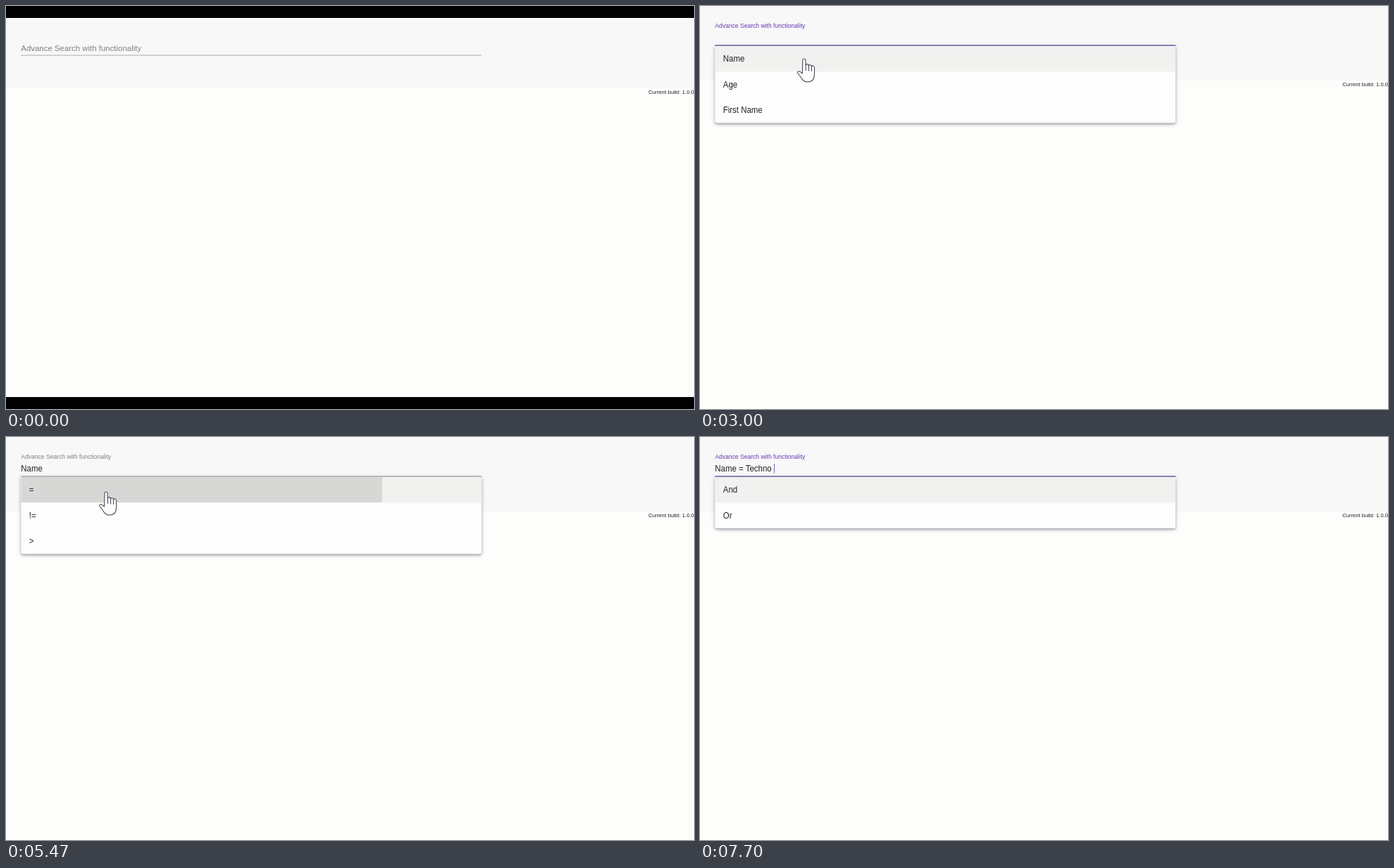
An HTML page with a canvas for the animation above (8000 ms loop, 977x573 px).

```html
<!DOCTYPE html>
<html lang="en">
<head>
<meta charset="utf-8">
<title>Advance Search</title>
<style>
  html, body { margin: 0; width: 100%; height: 100%; overflow: hidden; background: #000; }
  canvas { display: block; width: 977px; height: 573px; }
</style>
</head>
<body>
<canvas id="stage" width="977" height="573"></canvas>
<script>
const ctx = document.getElementById('stage').getContext('2d');
const W = 977, H = 573, LOOP = 8000;
const TOP = 17, BOTTOM = 556;
const LEFT = 21.3, RIGHT = 675.3, LINE = 70, ROW = 34.28;
const PANEL_TOP = 70.5, BASELINE = 63.5;
const LABEL = 'Advance Search with functionality';
const GREY = [128, 128, 128], PURPLE = [103, 58, 183];

// Each list of options: when it opens and closes, and how long it unfolds.
const panels = [
  { from: 1400, to: 3470, open: 0, rows: ['Name', 'Age', 'First Name'] },
  { from: 3630, to: 5570, open: 100, rows: ['=', '!=', '>'] },
  { from: 5770, to: 7130, open: 100, rows: ['Niren', 'Techno', 'Saviour', 'LunarGardener', 'Niren Kamesh Dey'] },
  { from: 7670, to: LOOP, open: 0, rows: ['And', 'Or'] }
];
const values = [[7470, 'Name = Techno '], [5680, 'Name = '], [3570, 'Name '], [0, '']];
const focusSpans = [
  { from: 1400, to: 3170, grow: 0 },
  { from: 3470, to: 5270, grow: 300 },
  { from: 5570, to: LOOP, grow: 300 }
];
const blinkStarts = [7670, 5830, 3800, 1400];
const ripples = [{ at: 3200, x: 148, end: 3470 }, { at: 5300, x: 142, end: 5570 }];

const clamp = v => Math.max(0, Math.min(1, v));
const mix = (a, b, k) => a + (b - a) * k;
const phase = (t, from, length) => length ? clamp((t - from) / length) : +(t >= from);
const smooth = k => k * k * (3 - 2 * k);
const rgb = (a, b, k) => `rgb(${a.map((v, i) => Math.round(mix(v, b[i], k))).join(',')})`;

// Cubic bezier (0, 0, 0.2, 1)
function decelerate(x) {
  let lo = 0, hi = 1;
  for (let i = 0; i < 20; i++) {
    const u = (lo + hi) / 2;
    if (0.6 * u * u + 0.4 * u * u * u < x) lo = u; else hi = u;
  }
  return lo * lo * (3 - 2 * lo);
}

function rect(x, y, w, h, color) {
  ctx.fillStyle = color;
  ctx.fillRect(x, y, w, h);
}

function text(str, x, y, size, color, align = 'left') {
  ctx.font = `${size}px "Liberation Sans", Arial, sans-serif`;
  ctx.textAlign = align;
  ctx.fillStyle = color;
  ctx.fillText(str, x, y);
}

function focusLevel(t) {
  const span = focusSpans.find(s => t >= s.from && t < s.to);
  if (span) return phase(t, span.from, 150);
  const last = focusSpans.filter(s => t >= s.to).pop();
  return last ? 1 - phase(t, last.to, 150) : 0;
}

function drawField(t) {
  const float = decelerate(phase(t, 1400, 400));
  const color = rgb(GREY, PURPLE, focusLevel(t));
  text(LABEL, LEFT, mix(BASELINE, 46.3, float), mix(11.43, 8.57, float), color);

  const value = values.find(v => t >= v[0])[1];
  text(value, LEFT, BASELINE - 0.2, 11.43, '#222');

  rect(LEFT, LINE - 0.4, RIGHT - LEFT, 0.9, '#a4a4b4');
  const focus = focusSpans.find(s => t >= s.from && t < s.to);
  if (!focus) return;
  const half = (RIGHT - LEFT) / 2 * decelerate(phase(t, focus.from, focus.grow));
  rect((LEFT + RIGHT) / 2 - half, LINE - 0.9, half * 2, 1.5, '#8474ad');

  const start = blinkStarts.find(s => t >= s);
  const caretOn = start === undefined || (t - start) % 1000 < 500 ||
    (t >= focus.from && start < focus.from);
  if (caretOn) {
    const x = LEFT + ctx.measureText(value).width;
    rect(Math.round(x), 52.8, 1, 12.4, '#7a56bd');
  }
}

function panelShape(height) {
  ctx.beginPath();
  ctx.roundRect(LEFT, PANEL_TOP, RIGHT - LEFT, height, [0, 0, 3, 3]);
}

function drawPanel(t) {
  const panel = panels.find(p => t >= p.from && t < p.to);
  if (!panel) return;
  const height = panel.rows.length * ROW;
  const open = smooth(phase(t, panel.from, panel.open));

  ctx.save();
  ctx.globalAlpha = open;
  ctx.translate(0, PANEL_TOP);
  ctx.scale(1, mix(0.8, 1, open));
  ctx.translate(0, -PANEL_TOP);

  panelShape(height);
  ctx.fillStyle = '#fdfdfd';
  for (const [blur, offset, alpha] of [[7, 1, 0.16], [3.5, 2, 0.34]]) {
    ctx.shadowColor = `rgba(30,30,50,${alpha})`;
    ctx.shadowBlur = blur;
    ctx.shadowOffsetY = offset;
    ctx.fill();
  }
  ctx.shadowColor = 'transparent';
  ctx.clip();

  rect(LEFT, PANEL_TOP, RIGHT - LEFT, ROW, '#f1f1f0');
  if (t >= 6670 && t < 7130) rect(LEFT, PANEL_TOP + ROW, RIGHT - LEFT, ROW, '#f3f3f2');
  drawRipple(t);
  panel.rows.forEach((row, i) => text(row, 32.8, PANEL_TOP + ROW * i + 21.2, 11.43, '#222'));
  ctx.restore();

  const focused = focusSpans.some(s => t >= s.from && t < s.to);
  rect(LEFT, LINE - 0.9, RIGHT - LEFT, focused ? 1.4 : 1, focused ? '#8474ad' : '#a0a0a4');
}

function drawRipple(t) {
  const ripple = ripples.find(r => t >= r.at && t < r.end);
  if (!ripple) return;
  const radius = (RIGHT - ripple.x) * decelerate(phase(t, ripple.at, 450));
  ctx.save();
  ctx.beginPath();
  ctx.rect(LEFT, PANEL_TOP, RIGHT - LEFT, ROW);
  ctx.clip();
  ctx.beginPath();
  ctx.arc(ripple.x, PANEL_TOP + ROW / 2, radius, 0, Math.PI * 2);
  ctx.fillStyle = 'rgba(0,0,0,0.11)';
  ctx.fill();
  ctx.restore();
}

const hand = new Path2D(
  'M-2 2Q-2 0 0 0Q2 0 2 2L2.4 9Q3 7.4 4.6 7.6Q6.4 7.8 6.6 10Q7.2 8.4 8.8 8.7' +
  'Q10.4 9 10.6 11Q11.3 9.6 12.8 10Q14.6 10.5 14.7 13L14.7 22Q14.5 33 5 33' +
  'Q-1 33 -4 27L-9 20.5Q-10 18.5 -8 18Q-6 17.4 -4.2 19.5L-2.4 21Z');
const knuckles = new Path2D('M2.4 8V17M6.6 9.5V17.5M10.6 10.5V18');

function drawHand(t) {
  if (t < 2850 || t >= 7130) return;
  let x = 147.8, y = 75;
  if (t < 3000) y = mix(61, 75, smooth(phase(t, 2850, 150)));
  else if (t >= 6670) { x = 124; y = 95; }
  else {
    const k = smooth(phase(t, 4100, 200));
    x = mix(x, 142, k);
    y = mix(y, 78, k);
  }
  ctx.save();
  ctx.translate(x, y);
  ctx.fillStyle = '#fdfdfd';
  ctx.strokeStyle = '#4a4a58';
  ctx.lineWidth = 1.1;
  ctx.lineJoin = 'round';
  ctx.fill(hand);
  ctx.stroke(hand);
  ctx.stroke(knuckles);
  ctx.restore();
}

function draw(t) {
  const zoom = smooth(phase(t, 2470, 530));
  const top = mix(TOP, 0, zoom);
  const bottom = mix(BOTTOM, H, zoom);
  const scale = (bottom - top) / (BOTTOM - TOP);

  ctx.setTransform(1, 0, 0, 1, 0, 0);
  rect(0, 0, W, H, '#000');
  rect(0, top, W, bottom - top, '#fdfdfc');

  ctx.setTransform(1, 0, 0, scale, 0, top - TOP * scale);
  rect(0, TOP, W, 100, '#f8f8f8');
  text('Current build: 1.0.0', W, 124.5, 7.64, '#222', 'right');
  drawField(t);
  drawPanel(t);

  ctx.setTransform(1, 0, 0, 1, 0, 0);
  drawHand(t);
}

const begin = performance.now();
function frame() {
  draw((performance.now() - begin) % LOOP);
  requestAnimationFrame(frame);
}
frame();
</script>
</body>
</html>
```
